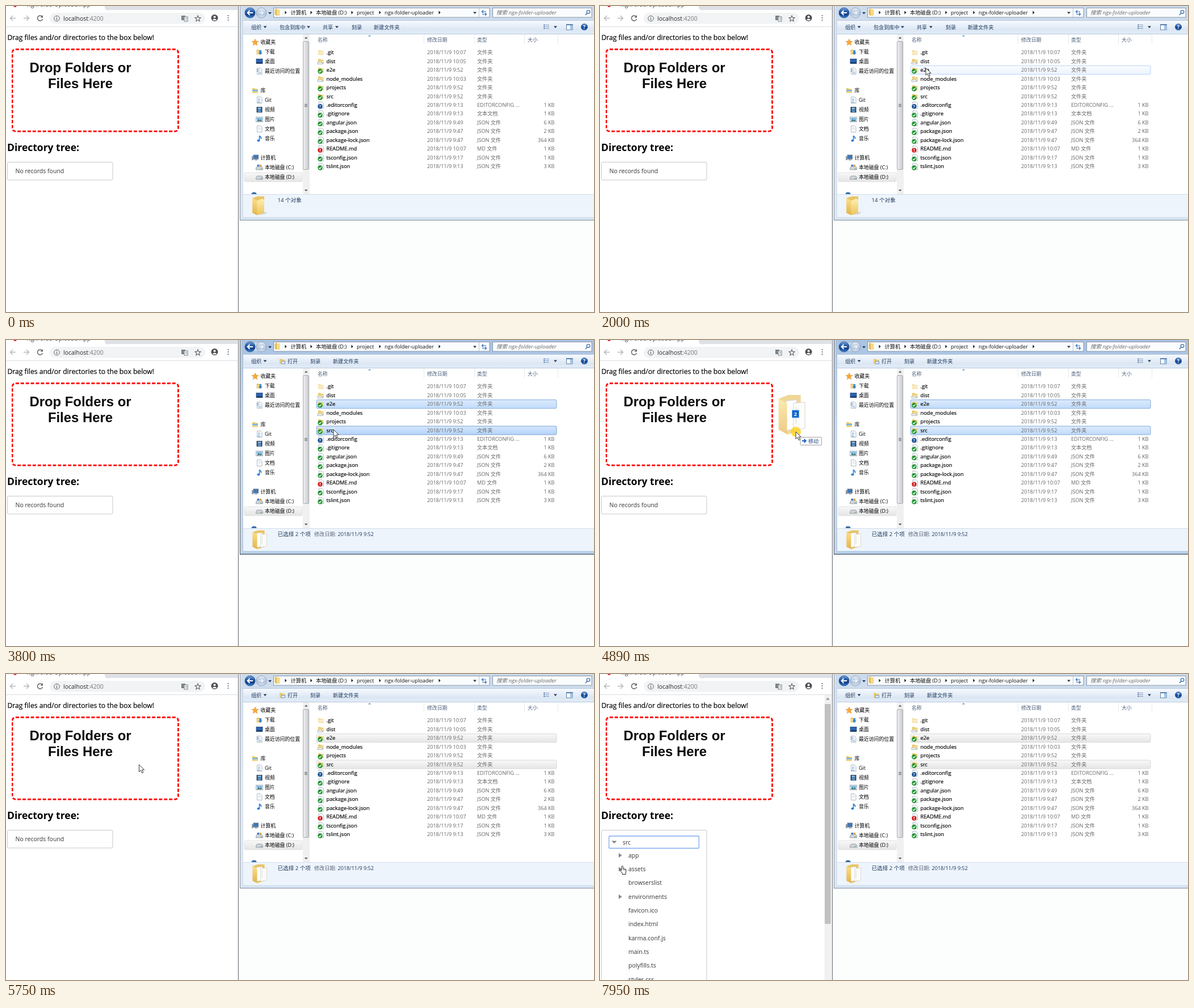
Recreate the animation shown at these times as an HTML page. Size 1036 by 540 pixels, loop 8000 ms.

```html
<!DOCTYPE html>
<html lang="zh-CN">
<head>
<meta charset="utf-8">
<title>Folder drop</title>
<style>
html,body{margin:0;width:100%;height:100%;overflow:hidden;background:#fff}
svg{display:block;width:1036px;height:540px}
text{font-family:'Open Sans','Noto Sans CJK SC',sans-serif;font-size:9.1px;white-space:pre}
.bold{font-family:'Liberation Sans',Arial,sans-serif;font-weight:700;font-size:23.9px}
.ink{stroke:#000;stroke-width:.18px}
.drop{box-sizing:border-box;width:400px;height:200px;border:4px dashed #f00;border-radius:10px}
</style>
</head>
<body>
<svg id="stage" viewBox="0 0 1036 540" xmlns="http://www.w3.org/2000/svg"></svg>
<script>
const LOOP = 8000;

// ---- drawing helpers -------------------------------------------------
const text = (x, y, s, o = '') => `<text x="${x}" y="${y}" ${o}>${s}</text>`;
const size = (px, fill = '#000') => `style="font-size:${px}px" fill="${fill}"`;
const ink = px => `class="ink" ${size(px)}`;
const rect = (x, y, w, h, fill, o = '') => `<rect x="${x}" y="${y}" width="${w}" height="${h}" fill="${fill}" ${o}/>`;
const circle = (x, y, r, fill, o = '') => `<circle cx="${x}" cy="${y}" r="${r}" fill="${fill}" ${o}/>`;
const path = (d, fill = 'none', o = '') => `<path d="${d}" fill="${fill}" ${o}/>`;
const line = (d, c, w = 1) => path(d, 'none', `stroke="${c}" stroke-width="${w}"`);
const at = (x, y, s) => `<g transform="translate(${x} ${y})">${s}</g>`;
const group = (id, s, hidden) => `<g id="${id}" ${hidden ? 'display="none"' : ''}>${s}</g>`;
const down = (x, y, c = '#1e395b') => path(`M${x - 3} ${y - 1.5}h6l-3 3.5z`, c);
const grad = (id, stops, dir = 'x2="0" y2="1"') => `<linearGradient id="${id}" ${dir}>` +
  stops.map((c, i) => `<stop offset="${i / (stops.length - 1)}" stop-color="${c}"/>`).join('') + '</linearGradient>';

const defs = `<defs>
${grad('bar', ['#f7fafe', '#eaf1fa', '#dce7f4', '#e2ecf7'])}
${grad('frameOn', ['#a9c3e2', '#c4d9f0', '#b9d1ea'])}
${grad('frameOff', ['#ccdbec', '#dbe7f4', '#d7e4f2'])}
${grad('hover', ['#fafcff', '#ebf3fd'])}
${grad('pick', ['#dcebfc', '#c1dbfc'])}
${grad('pickHover', ['#d5e7fd', '#b4d3fb'])}
${grad('idle', ['#f8f8f8', '#e5e5e5'])}
${grad('ball', ['#7fa8dc', '#2b62ae', '#123f8c', '#3b86d4'])}
${grad('pale', ['#eef3fa', '#c3d2e6', '#b4c6de', '#dbe6f3'])}
${grad('fold', ['#fdeeb0', '#ecc55c'])}
${grad('flap', ['#fbe08a', '#e2b34c'])}
${grad('thumb', ['#f0f0f1', '#dcdde0', '#c8cacd'], 'x2="1" y2="0"')}
</defs>`;

// ---- small icons, centred on 0,0 --------------------------------------
const folder = path('M-5 -4h4l1 1.3h4.500v7h-9.500z', '#e9c766') + path('M-5 4.300l1.500-5h8.500l-.5 5z', 'url(#fold)');
const page = path('M-4 -5.500h6l2.500 2.500v8.500h-8.500z', '#fff', 'stroke="#9aa7b5" stroke-width=".8"') + line('M-2 -2h4M-2 0h5', '#b8c7d8', .8);
const check = circle(-1.5, 2.3, 4.2, '#17922b') + line('M-3.800 2.300l1.700 1.800 3-3.700', '#fff', 1.4);
const disk = path('M-6 1l2-3h8l2 3v3h-12z', '#cfd4da', 'stroke="#7d858e" stroke-width=".7"') + rect(2, 1.8, 2.5, 1.2, '#4cba4a');
const icons = {
  git: `<g opacity=".55">${folder}</g>`,
  dist: folder + path('M-6 1.500h8l1 3.500h-9z', '#eceff3', 'stroke="#8a96a6" stroke-width=".6"'),
  ok: folder + check,
  file: page + check,
  ask: page + circle(-1.5, 2.3, 4.2, '#174f94') + text(-3.4, 5.1, '?', 'style="font-size:7.5px;font-weight:700" fill="#fff"'),
  bad: page + circle(-1.5, 2.3, 4.2, '#d81e1e') + line('M-1.500 -.2v3M-1.500 3.800v1.200', '#fff', 1.4),
  star: path('M0-6l1.700 4 4.300.3-3.300 2.900 1 4.300-3.700-2.300-3.700 2.300 1-4.300-3.300-2.900 4.300-.3z', '#f7a93b', 'stroke="#d98518" stroke-width=".5"'),
  load: folder + path('M0-3h3v4h2l-3.500 4-3.500-4h2z', '#2f7fd6'),
  desk: rect(-5.5, -4.5, 11, 8, '#2a63b4', 'stroke="#23426d" stroke-width=".8"') + rect(-5, 1.5, 10, 2, '#16335f'),
  recent: page + line('M-5 -3h4M-5 0h4M-2 3h5', '#4e7fb9', 1.2),
  lib: folder + path('M-5 -1h10v2.500h-10z', '#6fb6e8'),
  repo: page + line('M-1 -3v6M-4 4h6', '#6aa0d0', 1),
  film: rect(-5, -5, 10, 10, '#35465c') + rect(-2.8, -3.8, 5.6, 3.5, '#7db6e8') + rect(-2.8, .7, 5.6, 3.5, '#5e9ed8'),
  image: rect(-6, -4, 12, 8.5, '#fff', 'stroke="#8d9bac" stroke-width=".8"') + rect(-5, -3, 10, 3.5, '#7fc0ee') + path('M-5 3.500l3-4 3 2 2-2 2 4z', '#3c7d86'),
  doc: page,
  note: line('M0 3.500v-8.500c1 2 4 2 3 5.500', '#2e80d8', 1.7) + `<ellipse cx="-1.600" cy="3.600" rx="2.500" ry="2" fill="#2e80d8"/>`,
  pc: rect(-3, -5, 8.5, 7, '#3f78b9', 'stroke="#6d7a89"') + rect(-6, -3, 3, 7, '#8d99a6') + rect(-1, 3, 5, 1.2, '#7b8794'),
  sys: disk + rect(-4, -5, 3.5, 3, '#3b7bd0') + rect(0, -5, 3.5, 3, '#e0a53b'),
  disk,
  open: folder + rect(-2, 0, 6.5, 4.5, '#dbe9f8', 'stroke="#5a86b8" stroke-width=".8"')
};
const icon = (k, x, y) => at(x, y, icons[k]);

// ---- browser window ----------------------------------------------------
function browser() {
  const gray = '#5f6368', pale = '#b4b7ba';
  let s = rect(0, 0, 409, 540, '#fff') + rect(180, 0, 229, 7, '#dee1e6') + path('M174 0h8v8q-6 0-8-4z', '#dee1e6');
  s += circle(16, -1, 3, '#dd1b33') + text(36, .6, 'NgxFolderUploaderApp', size(10.3, '#444'));
  s += line('M17 21.500H8M12 17l-4.500 4.500L12 26', pale, 1.4) + line('M31 21.500h9M36 17l4.500 4.500-4.500 4.500', pale, 1.4);
  s += line('M63.500 18.500a4.600 4.600 0 1 0 1 4.500', gray, 1.5) + path('M65 16v4.500h-4.500z', gray);
  s += rect(77, 12, 274, 19.5, '#f1f3f4', 'rx="9.750"');
  s += circle(89.5, 22, 4.8, 'none', `stroke="${gray}"`) + line('M89.500 21v4M89.500 18.800v1.200', gray, 1.2);
  s += text(101, 25.7, 'localhost<tspan fill="#777b80">:4200</tspan>', size(10.5, '#26282b'));
  s += rect(309, 17, 7, 8, '#7b8086') + rect(314, 19, 6, 8, '#f1f3f4', 'stroke="#7b8086"') + line('M311 21h3M316 22h3M317.500 21v4', '#a5a9ad', .9);
  s += at(338, 22, path('M0-5l1.400 3.400 3.600.3-2.800 2.400.9 3.700-3.100-2-3.100 2 .9-3.700-2.800-2.400 3.600-.3z', 'none', `stroke="${gray}" stroke-width="1.100"`));
  s += circle(367.5, 21, 6, '#4b4f54') + circle(367.5, 19.3, 2, '#fff') + path('M363.700 24.200q3.800-3.300 7.600 0-3.800 2.800-7.600 0z', '#fff');
  s += [17, 21, 25].map(y => circle(391.5, y, 1.1, gray)).join('') + line('M0 36.500h409', '#dcdee1');
  s += text(2.5, 60.3, 'Drag files and/or directories to the box below!', ink(12.15));
  s += group('red', rect(9.5, 75, 295.5, 147.5, '#f00', 'rx="7.400"'), true);
  s += '<foreignObject width="400" height="200" transform="translate(9.500 75) scale(.7388)"><div xmlns="http://www.w3.org/1999/xhtml" class="drop"></div></foreignObject>';
  s += text(131, 117, 'Drop Folders or', 'class="bold" text-anchor="middle" fill="#0a0a0a"');
  s += text(131, 145, 'Files Here', 'class="bold" text-anchor="middle" fill="#0a0a0a"');
  s += text(2, 256, 'Directory tree:', 'style="font-size:17.500px;font-weight:700"');
  return s + tree() + line('M408.500 0V540', '#e3e5e8') + line('M409.500 0V540', '#70757c');
}

function tree() {
  const label = (x, y, s) => text(x, y + 3.6, s, size(10.5, '#333'));
  const closed = (x, y) => path(`M${x - 2.5} ${y - 4}l5.500 4-5.500 4z`, '#808285');
  const box = h => rect(2.5, 275.5, 185.5, h, '#fff', 'rx="2" stroke="#c8c8c8"');
  const kids = ['>app', '>assets', 'browserslist', '>environments', 'favicon.ico', 'index.html',
    'karma.conf.js', 'main.ts', 'polyfills.ts', 'styles.css'];
  let open = box(300) + path('M20.500 294.500h9l-4.500 4.500z', '#808285') + label(40, 297, 'src');
  kids.forEach((k, i) => {
    const y = 320.1 + 24.33 * i;
    open += (k[0] == '>' ? closed(35.5, y) : '') + label(50, y, k.replace('>', ''));
  });
  open += rect(395.5, 37, 12, 503, '#f1f1f1') + rect(396, 53, 10.5, 388, '#c1c1c1') + path('M398 45.500h6.500l-3.200-3.800z', '#8a8a8a');
  return group('empty', box(31.5) + label(16.5, 291.5, 'No records found')) +
    group('shut', box(69) + closed(25.5, 297) + label(40, 297, 'src') + closed(25.5, 321.3) + label(40, 321.3, 'e2e'), true) +
    group('open', open, true) +
    group('focus', rect(15.8, 286, 158.5, 21.5, 'none', 'stroke="#7ea9ee" stroke-width="1.300" rx="1"'), true);
}

// ---- file manager ------------------------------------------------------
const files = [
  '.git|10:07|文件夹||git', 'dist|10:05|文件夹||dist', 'e2e|9:52|文件夹||ok', 'node_modules|10:03|文件夹||dist',
  'projects|9:52|文件夹||ok', 'src|9:52|文件夹||ok', '.editorconfig|9:13|EDITORCONFIG ...|1|ask',
  '.gitignore|9:13|文本文档|1|file', 'angular.json|9:49|JSON 文件|6|file', 'package.json|9:47|JSON 文件|2|file',
  'package-lock.json|9:47|JSON 文件|364|file', 'README.md|10:07|MD 文件|1|bad',
  'tsconfig.json|9:17|JSON 文件|1|file', 'tslint.json|9:13|JSON 文件|3|file'
];
const rowY = i => 82 + 15.48 * i;
const rowAt = y => Math.floor((y - 74.2) / 15.48);

const side = ['star|64|收藏夹', 'load|81|下载', 'desk|98|桌面', 'recent|115|最近访问的位置', 'lib|149|库', 'repo|166|Git',
  'film|183|视频', 'image|200|图片', 'doc|217|文档', 'note|234|音乐', 'pc|268|计算机', 'sys|285|本地磁盘 (C:)', 'disk|302|本地磁盘 (D:)'];

function bigFolder(papers) {
  const back = path('M1 4l9-3h12v29l-12 4-9-4z', '#e9c566');
  const sheet = (d, c) => path(d, c, 'stroke="#bfc0bd" stroke-width=".5"');
  const inside = papers
    ? sheet('M8 6l10-1v24l-10 2z', '#fff') + sheet('M15 8l11-1v22l-11 2z', '#fbfbf8') + line('M17.500 11v14', '#d9dbd6')
    : path('M20 31l8-4-4 5-12 2z', '#8b93a0', 'opacity=".35"') + path('M9 9l9-4 4 2v22l-13 5z', 'url(#fold)');
  return back + inside + path('M1 4l8 4v26l-8-4z', 'url(#flap)');
}

function commands(id, items, open) {
  let s = text(432, 40.8, '组织') + down(456.5, 37);
  if (open) s += icon('open', 487, 37.5) + text(496, 40.8, '打开');
  for (const [x, label, arrow] of items) s += text(x, 40.8, label) + (arrow ? down(arrow, 37) : '');
  return group(id, `<g fill="#1e395b">${s}</g>`, id != 'cmd0');
}

const frame = (fill, edge) => rect(412.5, -2.5, 640, 380.5, fill, `stroke="${edge}"`) + line('M413.500 0V377', '#f2f7fc');

function explorer() {
  let s = frame('url(#frameOff)', '#7c8896') + group('active', frame('url(#frameOn)', '#39424d'), true);
  s += rect(418, 25, 618, 347, '#fff');
  // address row
  s += rect(421, 5, 38, 14, '#cddbea', 'rx="7"');
  s += circle(430, 12, 9, 'url(#ball)', 'stroke="#274d80" stroke-width=".8"') + line('M435 12h-9M429.500 8l-4 4 4 4', '#fff', 2);
  s += circle(450, 12, 8.8, 'url(#pale)', 'stroke="#7e93ad" stroke-width=".8"') + line('M446 12h7M450 9l3 3-3 3', '#f4f8fc', 1.5) + down(465, 12.5);
  s += rect(471.5, 3.5, 380.5, 16.5, '#fafcfe', 'stroke="#8796aa"') + line('M833.500 4V20', '#b9c6d5');
  s += path('M473.500 6l4-1.500v13l-4-2z', '#e6bd56') + path('M477.500 6h5v11h-5z', '#f7da87');
  for (const x of [493, 538, 610, 659, 764]) s += path(`M${x - 1.5} 8.500l3 3-3 3z`, '#111');
  const crumb = size(9.3, '#111');
  s += text(501.5, 14.8, '计算机', crumb) + text(546, 14.8, '本地磁盘 (D:)', crumb) + text(618, 14.8, 'project', crumb) + text(667, 14.8, 'ngx-folder-uploader', crumb);
  s += down(826, 12, '#333') + line('M846 10h-7M841 7.500l-2.500 2.500 2.500 2.500M839 14.500h7M844 12l2.500 2.500-2.500 2.500', '#2f6fbd', 1.2);
  s += rect(857.5, 3.5, 174.5, 16.5, '#fafcfe', 'stroke="#8796aa"') + text(864, 14.8, '搜索 ngx-folder-uploader', 'style="font-size:9.600px;font-style:italic" fill="#6b6b6b"');
  s += circle(1026, 10.5, 2.8, 'none', 'stroke="#3f73b0" stroke-width="1.300"') + line('M1024 12.500l-3 3.500', '#3f73b0', 1.6);
  // command row
  s += rect(418, 25, 618, 24.5, 'url(#bar)') + line('M418 49.500H1036M418 25.500H1036', '#b6c7dc');
  s += commands('cmd0', [[482, '包含到库中', 533], [558, '共享', 583], [609, '刻录'], [648, '新建文件夹']]);
  s += commands('cmd1', [[536, '包含到库中', 587], [613, '共享', 638], [663, '刻录'], [703, '新建文件夹']], true);
  s += commands('cmd2', [[536, '刻录'], [576, '新建文件夹']], true);
  s += line('M947 33.500h3M947 36.500h3M947 39.500h3', '#4b79b0', 1.6) + line('M951 33.500h6M951 36.500h6M951 39.500h6', '#8798ac') + down(968, 37);
  s += rect(987.5, 32.5, 10.5, 9.5, '#fff', 'stroke="#5d7da4"') + rect(994, 33, 4, 9, '#9cc3ec') + rect(987, 32, 11.5, 2, '#5d7da4');
  s += circle(1019, 37, 5.6, 'url(#ball)', 'stroke="#1c4a8c" stroke-width=".7"') + text(1016.7, 40.4, '?', 'style="font-size:9px;font-weight:700" fill="#fff"');
  // navigation pane
  s += rect(420, 294, 102, 16, 'url(#idle)', 'rx="2" stroke="#dcdcdc" stroke-width=".8"');
  for (const item of side) {
    const [k, y, name] = item.split('|'), top = /^(star|lib|pc)$/.test(k);
    s += icon(k, top ? 439 : 446.5, +y) + text(top ? 448.5 : 456, +y + 3.4, name, size(8.9));
  }
  s += path('M432.500 332a4.500 3.500 0 0 1 9 0z', '#3a6ea8');
  s += rect(523, 50, 12, 282, '#f0f0f1') + rect(523.5, 62.5, 10, 226, 'url(#thumb)', 'rx="1.500" stroke="#a2a4a9" stroke-width=".9"');
  s += line('M526 173.500h5M526 175.500h5M526 177.500h5', '#6b6f75') + path('M526 57.500h5.500l-2.700-3z', '#4a4e55') + path('M526 324h5.500l-2.700 3z', '#4a4e55');
  // list header
  for (const x of [736.5, 825.5, 913.5, 972.5]) s += line(`M${x} 50v17`, '#e3e8ee');
  s += path('M637.500 53.500h6l-3-2.500z', '#6ba0cb');
  [[549, '名称'], [742, '修改日期'], [830, '类型'], [919, '大小']].forEach(([x, n]) => s += text(x, 62.6, n, size(8.9, '#4c607a')));
  // rows
  s += files.map((f, i) => rect(547.2, +(rowY(i) - 7.4).toFixed(2), 422.8, 15.1, 'none', `id="row${i}" rx="2"`)).join('');
  files.forEach((f, i) => {
    const [name, time, type, kb, k] = f.split('|'), y = rowY(i), b = +(y + 3.1).toFixed(2), c = 'fill="#666"';
    s += icon(k, 555, y) + text(564.5, b, name, ink(9.25)) + text(742, b, '2018/11/9 ' + time, c) + text(830, b, type, c);
    if (kb) s += text(966.5, b, kb + ' KB', c + ' text-anchor="end"');
  });
  // details pane
  s += rect(418, 332, 618, 39.5, '#eef4fc') + line('M418 332.500H1036', '#d3deeb');
  const dark = size(9.6, '#1e395b'), soft = 'fill="#5a6779"', val = 'fill="#1e395b"';
  s += group('det0', at(433, 335, bigFolder()) + text(478.5, 345.8, '14 个对象', dark));
  s += group('det1', text(477, 345.8, 'e2e', dark) + text(507, 345.8, '修改日期:', soft) + text(549, 345.8, '2018/11/9 9:52', val) + text(477, 359.5, '文件夹', soft), true);
  s += group('det2', text(478.5, 345.8, '已选择 2 个项', dark) + text(543, 345.8, '修改日期:', soft) + text(584.5, 345.8, '2018/11/9 9:52', val), true);
  return s + group('papers', at(433.5, 335, bigFolder(true)), true);
}

// ---- pointer and drag image, both with the tip at 0,0 -------------------
const arrow = path('M0 0v12.600l3-2.700 2.200 4.900 2.200-1-2.200-4.700h4z', '#fff', 'stroke="#222" stroke-width=".9"');
const hand = path('M-1.500 7v-6q1.300-1.800 2.600 0v4l4 .8q1.600.4 1.500 2l-.8 5v2.200h-6v-2.200l-4-4.500q.6-2 2.700-.2z', '#fff', 'stroke="#222" stroke-width="1"') + line('M1.500 5v3M3.500 5.500v3M5.300 6v2.500', '#555', .7);
const ghost = rect(-38.5, -69, 76.5, 77, '#fff', 'rx="3" opacity=".38"') +
  `<g opacity=".68"><g transform="translate(-32 -67) scale(1.850 2.100)">${bigFolder(true)}</g></g>` +
  rect(-6.5, -38, 12, 13, '#1464c8', 'stroke="#5c9be2" stroke-width=".8"') + text(-.6, -28, '2', 'text-anchor="middle" style="font-weight:700" fill="#fff"');
const tip = rect(8, 9.5, 37.5, 14, '#fdfdfe', 'rx="1.500" stroke="#8a8a8a" stroke-width=".8"') +
  line('M11 16h6M14.500 13l3.300 3-3.300 3', '#1a62c5', 1.8) + text(22, 19.8, '移动', 'fill="#2a4a8c"');

const stage = document.getElementById('stage');
stage.innerHTML = defs + rect(0, 0, 1036, 540, '#fcfdfd') + browser() + explorer() +
  group('pointer', group('ghost', ghost, true) + group('press', circle(0, 0, 9, '#ffd21f', 'opacity=".8"'), true) +
    group('arrow', arrow) + group('hand', hand, true) + group('tip', tip, true), true);
const el = {};
stage.querySelectorAll('[id]').forEach(e => el[e.id] = e);

// ---- timeline ------------------------------------------------------------
// time, x, y of the pointer; each place holds until the next
const moves = [[750, 910, 490], [840, 675, 293], [980, 636, 190], [1060, 608, 112], [1210, 608, 113], [1370, 594, 108],
  [1450, 582, 106], [1610, 578, 103], [1690, 575, 98], [1840, 574, 101], [1920, 574, 105], [2000, 574, 109.5], [2310, 574, 111],
  [2780, 577, 122], [2860, 579, 130], [3010, 581, 148], [3090, 580, 154], [3170, 577, 158], [4190, 578, 158], [4420, 579, 159],
  [4570, 550, 160], [4650, 511, 162], [4810, 425, 161], [4890, 345, 162], [4970, 285, 161], [5050, 250, 160], [5130, 234.5, 160],
  [6220, 110, 270], [6300, 24, 309], [6380, 88, 238], [6540, 52, 270], [6620, 27.5, 292], [7320, 27, 297], [7400, 26.5, 302],
  [7710, 32, 318], [7790, 37, 331], [7950, 39.5, 338.5]];
const within = (t, a, b) => t >= a && t < b;
const show = (id, on) => on ? el[id].removeAttribute('display') : el[id].setAttribute('display', 'none');
const looks = { hover: '#b8d6fb', pick: '#84acdd', pickHover: '#7da2ce', idle: '#d9d9d9' };

function rowLook(i, t, over) {
  const picked = (i == 2 && t >= 2310) || (i == 5 && t >= 3330);
  if (picked) return t >= 5750 ? 'idle' : over ? 'pickHover' : 'pick';
  return over ? 'hover' : '';
}

function draw(t) {
  const [, x, y] = moves.filter(m => m[0] <= t).pop() || [0, -50, -50];
  const drag = within(t, 4810, 5670);
  const over = x > 547 && x < 970 && t < 4570 ? rowAt(y) : -1;
  files.forEach((f, i) => {
    const look = rowLook(i, t, i == over), r = el['row' + i];
    r.setAttribute('fill', look ? `url(#${look})` : 'none');
    r.setAttribute('stroke', looks[look] || 'none');
  });
  el.pointer.setAttribute('transform', `translate(${x} ${y})`);
  show('pointer', t >= 750);
  show('ghost', drag);
  show('tip', drag);
  show('press', within(t, 2310, 2390) || within(t, 3330, 3410) || within(t, 4420, 5670) || within(t, 7080, 7240));
  show('hand', t >= 6620);
  show('arrow', t < 6620);
  show('red', drag && x < 305);
  show('active', within(t, 2310, 5750));
  show('cmd0', t < 2470);
  show('cmd1', within(t, 2470, 3800));
  show('cmd2', t >= 3800);
  show('det0', t < 2390);
  show('det1', within(t, 2390, 3640));
  show('det2', t >= 3640);
  show('papers', t >= 2390);
  show('empty', t < 5830);
  show('shut', within(t, 5830, 7160));
  show('open', t >= 7160);
  show('focus', t >= 7080);
}

const start = performance.now();
function loop() {
  draw((performance.now() - start) % LOOP);
  requestAnimationFrame(loop);
}
loop();
</script>
</body>
</html>
```
